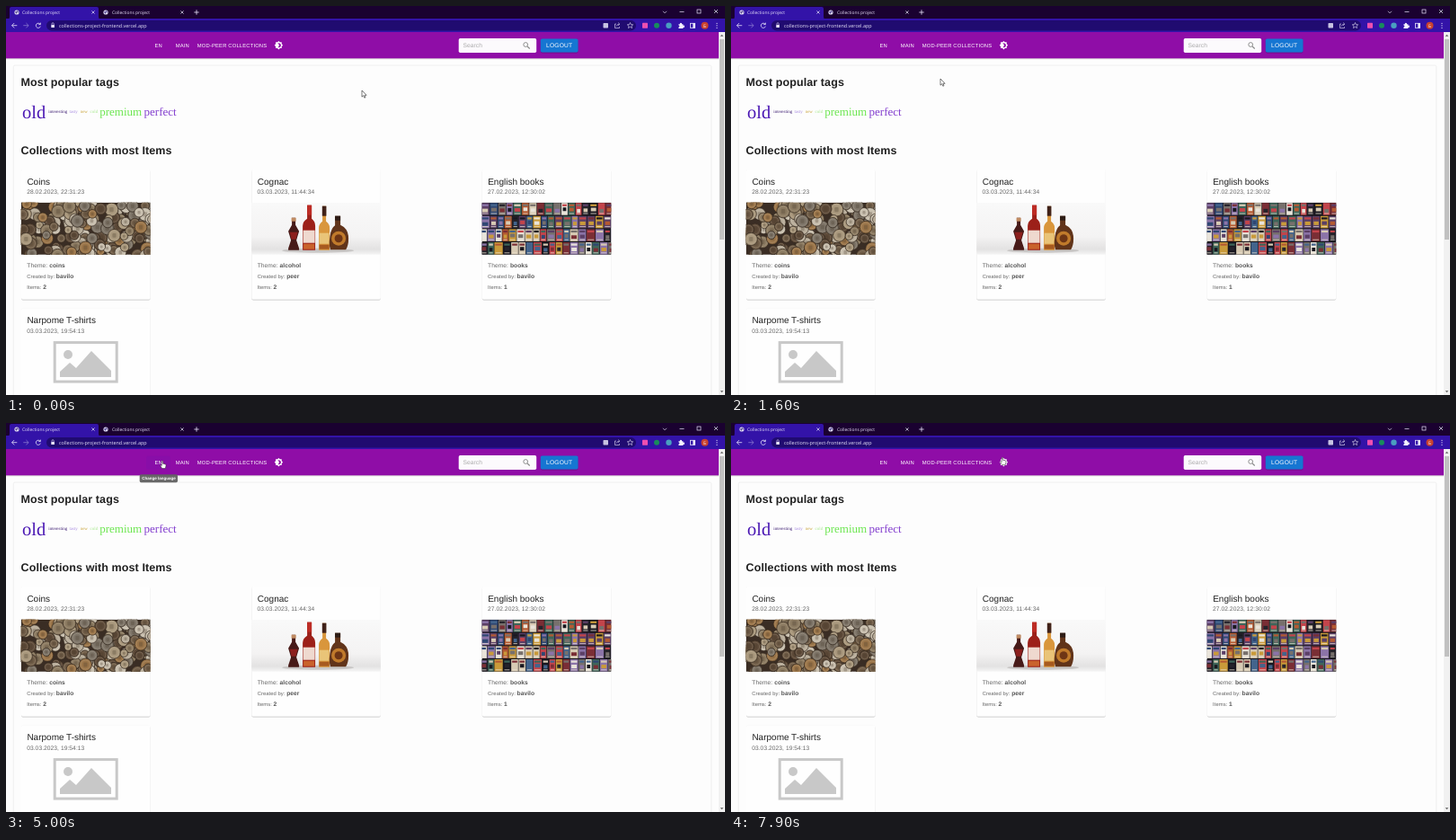
Animation of 800x433 px, one loop 8000 ms. Source, as an HTML page:

```html
<!DOCTYPE html>
<html lang="en">
<head>
<meta charset="utf-8">
<title>Collections project</title>
<style>
html, body { margin: 0; width: 100%; height: 100%; overflow: hidden; background: #fdfdfd; }
svg { display: block; width: 800px; height: 433px; }
text { font-family: "Liberation Sans", Arial, sans-serif; white-space: pre; text-rendering: geometricPrecision; }
.ui { font-family: "Open Sans", "Noto Sans", sans-serif; }
.tag { font-family: "Liberation Serif", serif; }
.bold { font-weight: 700; }
</style>
</head>
<body>
<svg id="stage" viewBox="0 0 800 433"></svg>
<script>
const LOOP = 8000;
const stage = document.getElementById('stage');

// Markup helpers
const attrs = o => Object.entries(o).map(([k, v]) => ` ${k}="${v}"`).join('');
const rect = (x, y, width, height, fill, more = {}) =>
  `<rect${attrs({ x, y, width, height, fill, ...more })}/>`;
const circle = (cx, cy, r, fill, more = {}) =>
  `<circle${attrs({ cx, cy, r, fill, ...more })}/>`;
const path = (d, fill, more = {}) => `<path${attrs({ d, fill, ...more })}/>`;
const line = (d, stroke, width = 0.8) => path(d, 'none', { stroke, 'stroke-width': width });
const text = (x, y, size, fill, content, more = {}) =>
  `<text${attrs({ x, y, 'font-size': size, fill, ...more })}>${content}</text>`;
const group = (content, more = {}) => `<g${attrs(more)}>${content}</g>`;

function random(seed) {
  return () => {
    seed = (seed * 1664525 + 1013904223) % 4294967296;
    return seed / 4294967296;
  };
}

const cross = (x, y, r, color) =>
  line(`M${x - r} ${y - r}l${2 * r} ${2 * r}m0 ${-2 * r}l${-2 * r} ${2 * r}`, color, 0.7);

function globe(x, y) {
  return circle(x, y, 2.6, '#d9d4ee') +
    path(`M${x - 1.8} ${y - 1}l1.6 .3 .4 1.2-1 1.3zM${x + 0.4} ${y - 2}l1.4 1-.4 1.6-1.2-.8z`, '#4a3a8c');
}

function browser() {
  const white = '#e9e5fa';
  const label = x => text(x, 9, 4.9, white, 'Collections project', { class: 'ui' });
  return rect(0, 0, 800, 15, '#1a0130') +
    path('M2 14.5Q4 14.5 4 12V3Q4 1 6 1H101Q103 1 103 3V12Q103 14.5 105 14.5Z', '#3313a8') +
    globe(12, 7) + label(18) + cross(97, 7, 1.6, white) +
    globe(111, 7) + label(118) + cross(196, 7, 1.6, white) +
    line('M209.3 7h5.4M212 4.3v5.4', white) +
    line('M731 5.8l2 2 2-2M749.5 6.5h5', white, 0.7) +
    rect(769, 4, 4, 4, 'none', { stroke: white, 'stroke-width': 0.7 }) +
    cross(790, 6, 2, white) +
    rect(0, 14, 800, 15, '#3313a8') +
    rect(45, 16, 656, 11.5, '#200b70', { rx: 5.7 }) +
    line('M12.3 21.7H6.6M9.2 19l-2.7 2.7 2.7 2.7', white) +
    line('M19.3 21.7H25M22.4 19l2.7 2.7-2.7 2.7', '#8a78d0') +
    line('M38 20.2A2.6 2.6 0 1 0 38.4 22.6M38.4 18.6V20.6H36.3', white) +
    rect(50.3, 21, 3.6, 3, white) + line('M51 21v-1.2a1.1 1.1 0 0 1 2.2 0V21', white, 0.6) +
    text(59, 23.7, 5.45, white, 'collections-project-frontend.vercel.app', { class: 'ui' }) +
    rect(664.5, 19, 5.5, 5.5, '#c7c3e2', { rx: 0.7 }) +
    line('M679 20h-1.5v4.5h5V23M679.3 22.6q.4-2.4 3-2.4M681.2 18.6l1.7 1.6-1.7 1.6', white, 0.6) +
    path('M694.5 18.5l.9 2.1 2.3.2-1.7 1.5.5 2.2-2-1.2-2 1.2.5-2.2-1.7-1.5 2.3-.2z', 'none',
      { stroke: white, 'stroke-width': 0.6 }) +
    rect(708, 18.7, 6, 6, '#ee4fb0', { rx: 0.6 }) +
    circle(724, 21.8, 3, '#188c5c') + circle(737.5, 21.8, 3.2, '#4a9fc0') +
    path('M748.4 20.2h1.5a1.1 1.1 0 1 1 2 0h1.5v1.5a1.1 1.1 0 1 1 0 2v1.4h-5v-1.5a1 1 0 1 0 0-2z', '#f5f3ff') +
    rect(761.6, 19.3, 5, 5, 'none', { stroke: white, 'stroke-width': 0.8 }) + rect(764.3, 19, 2.6, 5.6, white) +
    circle(777.5, 21.8, 4, '#c8412e') +
    text(777.5, 23.6, 4.8, '#fff', 'Б', { class: 'ui', 'text-anchor': 'middle' }) +
    [19.3, 21.8, 24.3].map(y => circle(791, y, 0.65, white)).join('');
}

function scrollbar() {
  return rect(793, 29, 7, 404, '#f1f1f1') + rect(794, 37, 5, 223, '#c1c1c1') +
    path('M794.7 33.7h3.6l-1.8-2zM794.7 428.3h3.6l-1.8 2z', '#606060');
}

function tagCloud() {
  const tags = [
    [18, 125, 20.5, '#4b18b4', 'old'], [47.3, 119, 4.95, '#3a1a70', 'interesting'],
    [70.5, 119, 4.95, '#a78ae0', 'tasty'], [82.7, 119, 4.95, '#c9a43c', 'new'],
    [93.6, 119, 4.95, '#a5e88c', 'cold'], [104.2, 122, 13, '#6ce650', 'premium'],
    [153.6, 122, 13, '#8440cf', 'perfect']
  ];
  return tags.map(([x, y, size, color, word]) => text(x, y, size, color, word, { class: 'tag' })).join('');
}

// Card pictures, drawn in a 143.5 x 58 box
function coinsPicture() {
  const next = random(11);
  const tones = ['#8b7a61', '#a8977c', '#b9ae9c', '#6f5c47', '#9a7448', '#c9c0b0', '#7d7468', '#5b4837'];
  let out = rect(0, 0, 144, 58, '#3a2d24');
  for (let i = 0; i < 190; i++) {
    const x = next() * 146, y = next() * 60, r = 4 + next() * 3.5;
    const tone = tones[Math.floor(next() * tones.length)];
    out += circle(x, y, r, tone, { stroke: '#33271e', 'stroke-width': 0.7 }) +
      circle(x, y, r * 0.72, 'none', { stroke: '#e2d7c0', 'stroke-width': 0.4, opacity: 0.45 }) +
      rect(x - r * 0.3, y - r * 0.35, r * 0.6, r * 0.7, '#4b3c2d', { rx: 1, opacity: 0.3 });
  }
  return out;
}

function bottlesPicture() {
  return rect(0, 0, 144, 58, 'url(#studio)') +
    `<ellipse cx="74" cy="53.5" rx="40" ry="2.5" fill="#8d8783" opacity=".35"/>` +
    path('M45 17h4v8l4 7-3 10 3 9v2H41v-2l3-9-3-10 4-7z', '#471a18') +
    path('M42.5 33h9l-2 8h-5z', '#8c1f1d') + rect(44.5, 17, 5, 4, '#c08b62') +
    path('M62 3h5v15q4 3 4 8v27H57V26q0-5 5-8z', '#9c2019') +
    rect(62, 3, 5, 11, '#bd2c25') + rect(57.5, 31, 13, 14, '#efd9cf') + rect(58, 46, 12, 6, '#c9622c') +
    path('M79 4h4v17q4 3 4 7v25H75V28q0-4 4-7z', '#d9963c') +
    rect(78.7, 4, 4.6, 11, '#402219') + rect(75.5, 34, 11, 12, '#e9c478') + rect(75.5, 47, 11, 5, '#a75a1f') +
    path('M93 15h6v10q9 4 9 15 0 8-3 12.5H88q-2-5-1-12 1-12 6-15z', '#61341a') +
    rect(93, 15, 6, 5, '#2d1c16') + circle(97, 40, 8, '#c07a2b') + circle(97, 40, 4.5, '#6e3515');
}

function booksPicture() {
  const next = random(29);
  const tones = ['#7a2e35', '#c3444b', '#2f4773', '#43648c', '#d8cbb4', '#e9e4da', '#25232b', '#191820',
    '#c99a3a', '#5b3f66', '#8b74a8', '#3e665a', '#b45a32', '#77706c'];
  const pick = () => tones[Math.floor(next() * tones.length)];
  let out = rect(0, 0, 144, 58, '#17151a');
  for (let row = 0; row < 4; row++) {
    for (let x = -next() * 4; x < 144;) {
      const w = 6.5 + next() * 3, y = row * 14.6 + 0.5;
      out += rect(x, y, w, 13.5, pick()) +
        rect(x + 1, y + 1.5, w - 2, 2.2, pick()) +
        rect(x + 1.5, y + 5 + next() * 2, w - 3, 4, pick()) +
        rect(x + 1.2, y + 11.3, w - 2.4, 1, '#eee4d4', { opacity: 0.75 });
      x += w + 0.6;
    }
  }
  return out;
}

function placeholder() {
  const gray = '#c8c8c8';
  return rect(54.2, 374.6, 69, 43.5, 'none', { stroke: gray, 'stroke-width': 3 }) +
    circle(69, 388, 5, gray) +
    path('M60 413V407L71 397L78 403L95 384L117 406V413Z', gray);
}

const cards = [
  { x: 17, y: 182, title: 'Coins', date: '28.02.2023, 22:31:23', theme: 'coins', owner: 'bavilo', items: 2, picture: coinsPicture },
  { x: 273.4, y: 182, title: 'Cognac', date: '03.03.2023, 11:44:34', theme: 'alcohol', owner: 'peer', items: 2, picture: bottlesPicture },
  { x: 529.8, y: 182, title: 'English books', date: '27.02.2023, 12:30:02', theme: 'books', owner: 'bavilo', items: 1, picture: booksPicture },
  { x: 17, y: 336.5, title: 'Narpome T-shirts', date: '03.03.2023, 19:54:13' }
];

function card({ x, y, title, date, picture }) {
  return rect(x, y, 143.5, 144.5, '#fefefe', { rx: 1.7, filter: 'url(#shadow)' }) +
    text(x + 6.4, y + 16.7, 10, '#212121', title) +
    text(x + 6.2, y + 27, 6.67, '#666', date, { 'letter-spacing': 0.06 }) +
    (picture ? `<svg x="${x - 0.3}" y="${y + 36.7}" width="143.8" height="58.3">${picture()}</svg>` : '');
}

const languages = {
  en: {
    code: 'EN', main: 'MAIN', mainX: 188.7, mine: 'MOD-PEER COLLECTIONS', mineX: 212.8, modeX: 303.4,
    search: 'Search', searchX: 503.7, logout: 'LOGOUT', buttonX: 594.8, buttonW: 41.7,
    popular: 'Most popular tags', largest: 'Collections with most Items',
    theme: 'Theme:', owner: 'Created by:', items: 'Items:'
  },
  ru: {
    code: 'RU', main: 'ГЛАВНАЯ', mainX: 186, mine: 'MOD-PEER КОЛЛЕКЦИИ', mineX: 220.8, modeX: 305.4,
    search: 'Поиск', searchX: 508, logout: 'ВЫЙТИ', buttonX: 599, buttonW: 37.5,
    popular: 'Самые популярные теги', largest: 'Коллекции с наибольшим количеством айтемов',
    theme: 'Тема:', owner: 'Владелец:', items: 'Айтемов:'
  }
};

function modeIcon(x) {
  return path('M20 8.69V4h-4.69L12 .69 8.69 4H4v4.69L.69 12 4 15.31V20h4.69L12 23.31 15.31 20H20v-4.69L23.31 12z' +
    'M12 18c-.89 0-1.74-.2-2.5-.55C11.56 16.5 13 14.42 13 12s-1.44-4.5-3.5-5.45C10.26 6.2 11.11 6 12 6c3.31 0 6 2.69 6 6s-2.69 6-6 6z',
    '#fff', { 'fill-rule': 'evenodd', transform: `translate(${x - 5} 38.7) scale(.417)` });
}

function localized(id, l) {
  const nav = (x, label) => text(x, 46, 5.83, '#fff', label, { 'letter-spacing': 0.167 });
  const heading = (y, label) =>
    text(16.6, y, 12.5, '#212121', label, { class: 'bold', 'letter-spacing': 0.1 });
  const row = (x, y, size, label, value) =>
    text(x + 6.3, y, size, '#666', `${label} <tspan class="bold" font-size="6.67" fill="#555">${value}</tspan>`,
      { 'letter-spacing': 0.06 });
  const details = c => row(c.x, 290.6, 6.67, l.theme, c.theme) +
    row(c.x, 303, 5.83, l.owner, c.owner) + row(c.x, 315, 5.83, l.items, c.items);
  const glass = l.searchX + 74.5;
  return group(
    nav(165.4, l.code) + nav(l.mainX, l.main) + nav(l.mineX, l.mine) + modeIcon(l.modeX) +
    rect(l.searchX, 36, 86.5, 16, '#fcfafd', { rx: 1.7 }) +
    text(l.searchX + 4.8, 46.2, 6.67, '#aaa', l.search, { 'letter-spacing': 0.06 }) +
    circle(glass, 43, 2.4, 'none', { stroke: '#858585', 'stroke-width': 0.9 }) +
    line(`M${glass + 1.8} 44.8l2.7 2.7`, '#858585', 1.1) +
    rect(l.buttonX, 36.4, l.buttonW, 15, '#1976d2', { rx: 1.7, filter: 'url(#shadow)' }) +
    text(l.buttonX + l.buttonW / 2, 46.3, 6.67, '#fff', l.logout, { 'text-anchor': 'middle', 'letter-spacing': 0.16 }) +
    heading(88.8, l.popular) + heading(164.6, l.largest) +
    cards.filter(c => c.theme).map(details).join(''), { id });
}

stage.innerHTML = `<defs>
  <filter id="shadow" x="-10%" y="-10%" width="120%" height="125%">
    <feDropShadow dx="0" dy=".7" stdDeviation=".7" flood-opacity=".32"/>
  </filter>
  <linearGradient id="studio" x2="0" y2="1">
    <stop offset="0" stop-color="#f9f9f9"/><stop offset=".65" stop-color="#f4f3f3"/>
    <stop offset=".9" stop-color="#e3e2e2"/><stop offset="1" stop-color="#f5f5f5"/>
  </linearGradient></defs>` +
  rect(0, 0, 800, 433, '#fdfdfd') +
  rect(8.3, 66, 776.5, 380, '#fdfdfd', { rx: 1.7, stroke: '#ececec', 'stroke-width': 0.8 }) +
  rect(0, 29, 793, 29.2, '#8f0fa7', { filter: 'url(#shadow)' }) +
  browser() + scrollbar() + tagCloud() + cards.map(card).join('') + placeholder() +
  rect(156, 36.8, 26.7, 14.6, '#4a20b0', { id: 'hover', rx: 1.7 }) +
  localized('en', languages.en) + localized('ru', languages.ru) +
  group(rect(148.7, 57.3, 42.3, 9, '#616161', { rx: 1.7, opacity: 0.94 }) +
    text(169.9, 63.3, 4.5, '#fff', 'Change language', { class: 'bold', 'text-anchor': 'middle' }), { id: 'tip' }) +
  path('M0 0V7.2L1.7 5.7L2.8 8.2L4 7.7L2.9 5.3H5.1Z', '#fff',
    { id: 'arrow', stroke: '#222', 'stroke-width': 0.6, 'stroke-linejoin': 'round' }) +
  path('M-.7 .6Q0-.4 .7 .6V3.3L3 3.8Q4.3 4.1 4 5.6L3.3 8.6H-.3L-2.3 5.6Q-2.1 4.4-.7 5.4Z', '#fff',
    { id: 'hand', stroke: '#222', 'stroke-width': 0.5, 'stroke-linejoin': 'round' });

const part = Object.fromEntries(['en', 'ru', 'hover', 'tip', 'arrow', 'hand'].map(id => [id, document.getElementById(id)]));
const show = (node, visible) => { node.style.display = visible ? '' : 'none'; };

// Pointer stops: time, x, y
const stops = [
  [0, 396, 94], [800, 216, 88], [1500, 233, 81], [3600, 233, 81], [4300, 174, 42], [5300, 174, 42],
  [5600, 172.5, 56], [6000, 172.5, 56], [6400, 173, 42], [6750, 173, 42], [7000, 171.5, 66],
  [7800, 302, 38], [LOOP, 302, 38]
];

function pointerAt(t) {
  const i = stops.findIndex(s => s[0] > t);
  const [t0, x0, y0] = stops[i - 1], [t1, x1, y1] = stops[i];
  const p = (t - t0) / (t1 - t0), e = p * p * (3 - 2 * p);
  return [x0 + (x1 - x0) * e, y0 + (y1 - y0) * e];
}

const clamp = v => Math.max(0, Math.min(1, v));
const pulse = (t, from, to, fade) => Math.min(clamp((t - from) / fade), clamp((to - t) / fade));

function draw(t) {
  const [x, y] = pointerAt(t);
  const inBar = y > 36.5 && y < 51.5;
  const onButton = inBar && (Math.abs(x - 169.3) < 13.4 || Math.abs(x - 303.4) < 7);
  for (const [name, on] of [['arrow', !onButton], ['hand', onButton]]) {
    show(part[name], on);
    part[name].setAttribute('transform', `translate(${x} ${y})`);
  }
  const russian = t >= 5300 && t < 6600;
  show(part.ru, russian);
  show(part.en, !russian);
  part.hover.setAttribute('opacity', 0.1 * Math.max(pulse(t, 4200, 5600, 200), pulse(t, 6250, 7200, 250)));
  part.tip.setAttribute('opacity', Math.max(pulse(t, 4300, 5550, 180), pulse(t, 6450, 6900, 150)));
}

const start = performance.now();
function tick() {
  draw((performance.now() - start) % LOOP);
  requestAnimationFrame(tick);
}
tick();
</script>
</body>
</html>
```
